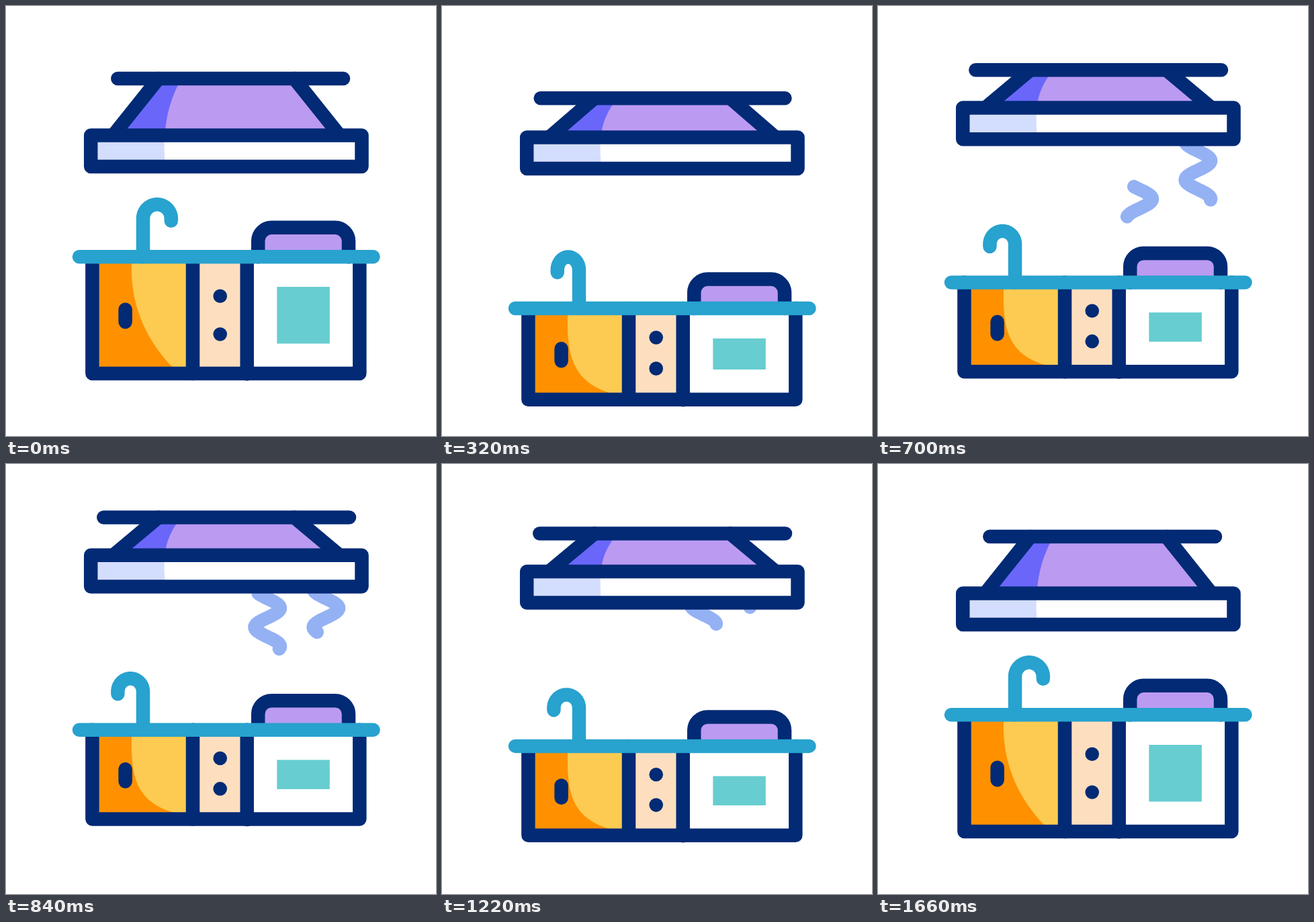
Write an HTML page with a canvas that moves like this. It is 640 by 640 pixels and loops after 2180 ms.

```html
<!DOCTYPE html>
<html lang="en">
<head>
<meta charset="utf-8">
<title>Kitchen</title>
<style>
  html, body { margin: 0; width: 100%; height: 100%; overflow: hidden; background: #fff; }
  canvas { display: block; width: 100vw; height: 100vh; }
</style>
</head>
<body>
<canvas id="stage" width="640" height="640"></canvas>
<script>
const ctx = document.getElementById('stage').getContext('2d');
const LOOP = 2180, ACTIVE = 1660, LINE = 20.5;
const NAVY = '#022a75', BLUE = '#28a2ce', PURPLE = '#bb9af2', VIOLET = '#6a66fa',
      PALE = '#d3ddfd', ORANGE = '#ff9100', YELLOW = '#fdcb51', PEACH = '#fddfbf',
      TEAL = '#67cdd0', STEAM = '#94b1f4';

const clamp = v => Math.min(1, Math.max(0, v));
const mix = (a, b, k) => a + (b - a) * k;
const part = (t, a, b) => clamp((t - a) / (b - a));
const smooth = p => p * p * (3 - 2 * p);

// Cubic easing with flat ends; x1 and x2 are the handle lengths.
function ease(p, x1, x2) {
  let lo = 0, hi = 1;
  for (let i = 0; i < 24; i++) {
    const u = (lo + hi) / 2, v = 1 - u;
    if (3 * u * v * v * x1 + 3 * u * u * v * x2 + u * u * u < p) lo = u; else hi = u;
  }
  return smooth((lo + hi) / 2);
}

function squash(t) {
  const p = t < 1000 ? part(t, 0, 417) : part(t, 1250, 1667);
  const e = ease(p, 0.333, 0.453);
  return t < 1000 ? e : 1 - e;
}

// Crouch, leap, then fall back to rest.
function lift(t) {
  if (t < 355) return 30 * ease(t / 355, 0.48, 0.65);
  if (t < 890) return mix(30, -30, smooth(part(t, 355, 890)));
  return -30 * (1 - Math.pow(part(t, 890, 1250), 1.9));
}

function stroke(color, build, width = LINE) {
  ctx.beginPath();
  build();
  ctx.strokeStyle = color;
  ctx.lineWidth = width;
  ctx.stroke();
}

function fill(color, build) {
  ctx.beginPath();
  build();
  ctx.fillStyle = color;
  ctx.fill();
}

function line(color, x1, y1, x2, y2) {
  stroke(color, () => { ctx.moveTo(x1, y1); ctx.lineTo(x2, y2); });
}

function box(color, x1, y1, x2, y2) {
  ctx.fillStyle = color;
  ctx.fillRect(x1, y1, x2 - x1, y2 - y1);
}

function drawSteam(t, mid) {
  const START = 353, TOP = 204;
  const tail = START - 0.161 * (t - 380);
  const head = Math.max(TOP, START - 0.43 * (t - 380));
  if (t < 380 || tail < TOP) return;
  const xAt = y => mid + 19 * Math.cos((y - 243) / 28.5 * Math.PI);
  stroke(STEAM, () => {
    ctx.moveTo(xAt(tail), tail);
    for (let y = tail - 1; y > head; y--) ctx.lineTo(xAt(y), y);
    ctx.lineTo(xAt(head), head);
  }, 20);
}

function drawHood(s) {
  const top = 108, y = mix(192.4, 164.4, s), low = y + 46.6;
  fill(PURPLE, () => {
    ctx.moveTo(227, top); ctx.lineTo(429, top);
    ctx.lineTo(496.5, y); ctx.lineTo(159.5, y);
  });
  fill(VIOLET, () => {
    ctx.moveTo(227, top); ctx.lineTo(261, top);
    ctx.quadraticCurveTo(238.5, mix(top, y, 0.476), 236.5, y);
    ctx.lineTo(159.5, y);
  });
  line(NAVY, 227, top, 159.5, y);
  line(NAVY, 429, top, 496.5, y);
  line(NAVY, mix(166.3, 145.3, s), top, mix(502, 511, s), top);
  box('#fff', 126, y, 529.4, low);
  fill(PALE, () => {
    ctx.moveTo(126, y); ctx.lineTo(235.6, y);
    ctx.quadraticCurveTo(235, y + 23, 236.8, low);
    ctx.lineTo(126, low);
  });
  stroke(NAVY, () => ctx.rect(126.2, y, 403.3, low - y));
}

function drawCabinet(s) {
  const y = mix(373.3, 424.3, s), low = mix(547, 557.2, s);
  const a = y + 10, b = low - 10, h = b - a;

  box(ORANGE, 128, y, 278, low);
  fill(YELLOW, () => {
    ctx.moveTo(187, y); ctx.lineTo(187, a);
    ctx.bezierCurveTo(mix(185, 186, s), a + mix(0.35, 0.5, s) * h,
                      mix(203, 192, s), a + mix(0.7, 0.85, s) * h, mix(247, 249, s), b);
    ctx.lineTo(258, low); ctx.lineTo(278, low); ctx.lineTo(278, y);
  });
  box(PEACH, 278, y, 358.7, low);
  box('#fff', 358.7, y, 526, low);
  box(TEAL, 403.3, mix(418, 469, s), 481.8, mix(502.5, 512.5, s));

  const grip = mix(461, 492, s);
  line(NAVY, 177.6, grip - 9.2, 177.6, grip + 9.2);
  for (const cy of [mix(431.7, 466.6, s), mix(488.5, 512, s)])
    fill(NAVY, () => ctx.arc(318.7, cy, 10.3, 0, 7));

  stroke(NAVY, () => {
    ctx.moveTo(128.4, y); ctx.lineTo(128.4, low);
    ctx.lineTo(526.3, low); ctx.lineTo(526.3, y);
  });
  line(NAVY, 278, y, 278, low);
  line(NAVY, 358.7, y, 358.7, low + 0.4);

  const pot = () => {
    ctx.moveTo(375.2, y);
    ctx.lineTo(375.2, y - 23.5);
    ctx.arcTo(375.2, y - 43.5, 395.2, y - 43.5, 20);
    ctx.lineTo(490, y - 43.5);
    ctx.arcTo(510, y - 43.5, 510, y - 23.5, 20);
    ctx.lineTo(510, y);
  };
  fill(PURPLE, pot);
  stroke(NAVY, pot);

  // The spout swings from right to left as the body folds.
  const reach = mix(41.8, -37.6, s), rx = reach / 2, bend = y - 57, ry = mix(21, 19.5, s);
  stroke(BLUE, () => {
    ctx.moveTo(204, y);
    for (let i = 0; i <= 40; i++) {
      const ang = Math.PI * i / 40;
      ctx.lineTo(204 + rx - rx * Math.cos(ang), bend - ry * Math.sin(ang));
    }
    ctx.lineTo(204 + reach, y - 53.5);
  });
  line(BLUE, 109, y, 546.5, y);
}

function draw(t) {
  ctx.setTransform(1, 0, 0, 1, 0, 0);
  box('#fff', 0, 0, 640, 640);
  ctx.lineCap = ctx.lineJoin = 'round';
  const s = t >= ACTIVE ? 0 : squash(t);
  ctx.translate(0, lift(t));
  drawSteam(t, 476.3);
  drawSteam(t - 155, 389.2);
  drawHood(s);
  drawCabinet(s);
}

const begin = performance.now();
function tick(now) {
  draw(Math.max(0, now - begin) % LOOP);
  requestAnimationFrame(tick);
}
draw(0);
requestAnimationFrame(tick);
</script>
</body>
</html>
```
